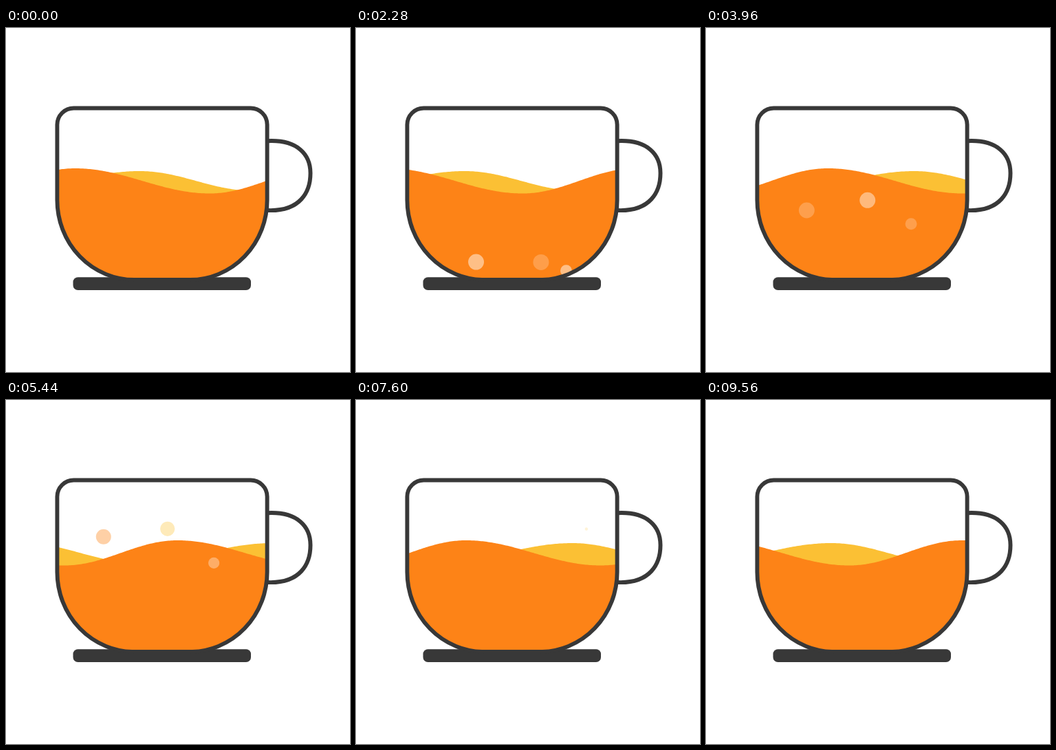
Write an HTML page that moves like this. It is 500 by 500 pixels and loops after 9.6 s.

```html
<!DOCTYPE html>
<html lang="en">
<head>
<meta charset="utf-8">
<title>Cup</title>
<style>
  html, body { margin: 0; width: 100%; height: 100%; overflow: hidden; background: #fff; }
  svg { display: block; width: 100vw; height: 100vh; }
</style>
</head>
<body>
<svg viewBox="0 0 500 500">
  <defs>
    <path id="cup" d="M98.500 116.500H355.500A24 24 0 0 1 379.600 140.500V250A112 116 0 0 1 267.500 366H186.500A112 116 0 0 1 74.400 250V140.500A24 24 0 0 1 98.500 116.500Z"/>
    <clipPath id="inside"><use href="#cup"/></clipPath>
    <clipPath id="liquid"><path id="surface"/></clipPath>
  </defs>
  <rect x="97.500" y="362.200" width="258.500" height="18.800" rx="7" fill="#383838"/>
  <g clip-path="url(#inside)">
    <path id="back" fill="#fbc034"/>
    <g id="air"></g>
    <path id="front" fill="#fd8317"/>
    <g id="fizz" clip-path="url(#liquid)" fill="#fff"></g>
  </g>
  <g fill="none" stroke="#383838" stroke-width="5.900">
    <use href="#cup"/>
    <path d="M380 164.200C424 162 442.500 184 442.500 211S428 267 380 265"/>
  </g>
</svg>
<script>
  const LOOP = 9600, LEFT = 76, RIGHT = 378, BOTTOM = 363;
  const $ = id => document.getElementById(id);

  // Each wave is two half cosines of unequal length, sliding right.
  const backWave = { crest: 194, period: 1200, top: 208, height: 28.5, fall: 164, rise: 197 };
  const frontWave = { crest: 100, period: 1232.7, top: 204, height: 36.5, fall: 196, rise: 164 };

  // y falls by speed and drag (px per s); xs are sway points spread evenly over the life.
  const bubbles = [
    { tint: '#fd8317', start: 1500, life: 6600, y: 375, speed: 44.7, drag: 0,
      r: 11.5, glow: .4, pulse: .14, xs: [188, 157, 140, 146, 128] },
    { tint: '#fbc034', start: 1640, life: 5800, y: 380, speed: 64, drag: 3.5,
      r: 11.5, glow: .37, pulse: -.12, xs: [282, 249, 230, 241, 262] },
    { tint: '#fbc034', start: 1800, life: 6100, y: 375, speed: 47.4, drag: 2.6,
      r: 8.5, glow: .75, pulse: .14, xs: [307, 301, 297, 315, 338] }
  ];

  function wavePath(w, t) {
    const length = w.fall + w.rise;
    const crest = w.crest + t / w.period * length;
    let d = `M${LEFT} ${BOTTOM}`;
    for (let x = LEFT; x <= RIGHT; x += 2) {
      const u = ((x - crest) % length + length) % length;
      const angle = u < w.fall ? u / w.fall : (length - u) / w.rise;
      const y = w.top + w.height * (1 - Math.cos(Math.PI * angle)) / 2;
      d += `L${x} ${y.toFixed(2)}`;
    }
    return d + `V${BOTTOM}Z`;
  }

  // Catmull-Rom through evenly spaced points, p from 0 to 1.
  function sway(xs, p) {
    const n = xs.length - 1, i = Math.min(Math.floor(p * n), n - 1), s = p * n - i;
    const b = xs[i], c = xs[i + 1], a = xs[i - 1] ?? b, d = xs[i + 2] ?? c;
    return b + s / 2 * (c - a + s * (2 * a - 5 * b + 4 * c - d + s * (3 * (b - c) + d - a)));
  }

  function addCircle(parent) {
    const c = document.createElementNS('http://www.w3.org/2000/svg', 'circle');
    return $(parent).appendChild(c);
  }

  function place(circle, x, y, r, opacity) {
    const attrs = { cx: x, cy: y, r, 'fill-opacity': opacity };
    for (const name in attrs) circle.setAttribute(name, attrs[name]);
  }

  function moveBubble(b, t) {
    const p = Math.min(Math.max((t - b.start) / b.life, 0), 1);
    const s = p * b.life / 1000;
    const fade = p > 0 ? 1 - p ** 6 : 0;
    const x = sway(b.xs, p), y = b.y - b.speed * s + b.drag * s * s, r = b.r * fade;
    place(b.wet, x, y, r, .34 + b.pulse * Math.cos(2 * Math.PI * (t - 2280) / 4200));
    place(b.air, x, y, r, b.glow * fade);
  }

  for (const b of bubbles) {
    b.air = addCircle('air');
    b.air.setAttribute('fill', b.tint);
    b.wet = addCircle('fizz');
  }

  function draw() {
    const t = performance.now() % LOOP;
    const front = wavePath(frontWave, t);
    $('back').setAttribute('d', wavePath(backWave, t));
    $('front').setAttribute('d', front);
    $('surface').setAttribute('d', front);
    bubbles.forEach(b => moveBubble(b, t));
    requestAnimationFrame(draw);
  }
  draw();
</script>
</body>
</html>
```
